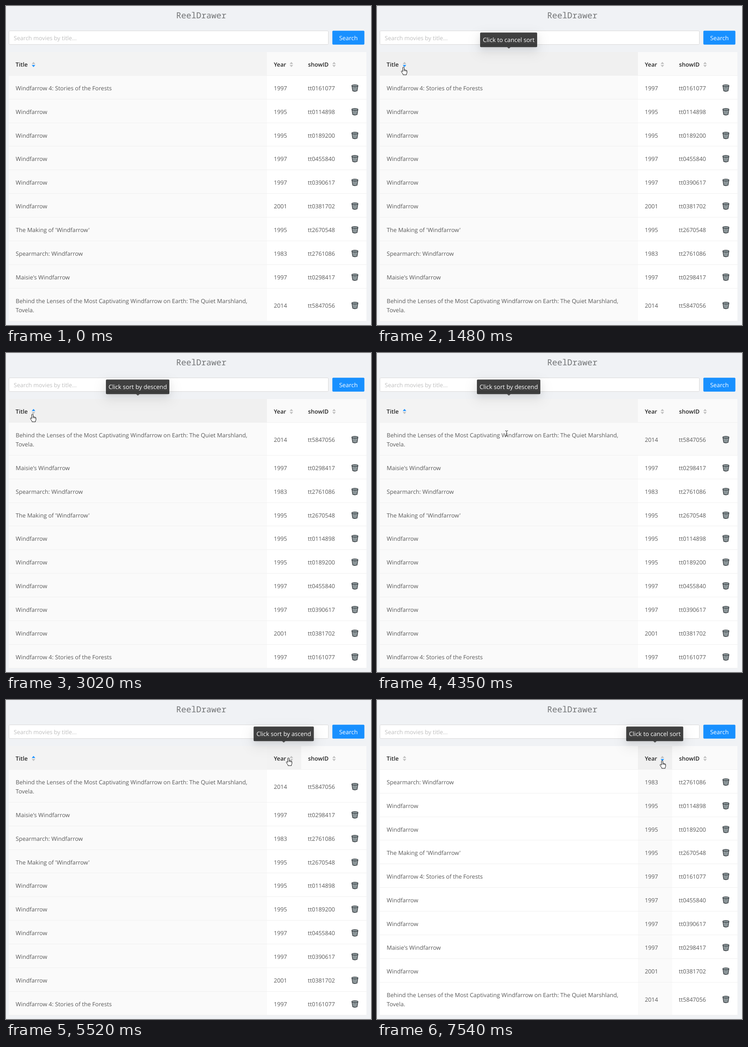
Animation, 800 px wide and 700 px high, one loop 8000 ms. Source, as an HTML page:

```html
<!DOCTYPE html>
<html lang="en">
<head>
<meta charset="utf-8">
<title>Sortable film table</title>
<style>
  html, body { margin: 0; width: 100%; height: 100%; overflow: hidden; background: #f0f2f5; }
  #stage { position: relative; width: 800px; height: 700px; overflow: hidden; }
  svg { position: absolute; left: 0; top: 0; }
  text, #tip { font: 12.65px "Open Sans", "Noto Sans", sans-serif; text-rendering: geometricPrecision; }
  text { fill: #595959; }
  .brand { font: 18.33px "Noto Sans Mono", "DejaVu Sans Mono", monospace; fill: #727476; }
  .head { font-weight: 600; fill: #262626; }
  .hint { fill: #bfbfbf; }
  .light { fill: #fff; font-size: 12.9px; }
  #tip {
    position: absolute; left: 0; top: 0; height: 31.6px; line-height: 32.4px; text-align: center;
    font-size: 13.1px; white-space: nowrap; color: #fff; background: rgba(0, 0, 0, .75); border-radius: 2px;
    box-shadow: 0 3px 6px -4px rgba(0,0,0,.12), 0 6px 16px rgba(0,0,0,.08), 0 9px 28px 8px rgba(0,0,0,.05);
  }
  #tip::after {
    content: ""; position: absolute; left: 50%; top: 100%; margin-left: -4px;
    border: 4px solid transparent; border-top: 3px solid #3d3d3d; border-bottom: 0;
  }
</style>
</head>
<body>
<div id="stage">
  <svg id="page" width="800" height="700">
    <defs>
      <g id="bin">
        <path d="M.9 3 2.6 14Q7.5 16.6 12.4 14L14.1 3Z" fill="#a3adb0"/>
        <path d="M3 5 11 14M6.5 5 12 11M2.5 8.5 7.5 15M12 5 4 14M8.5 5 3 11M12.7 8.5 7.5 15" stroke="#5d676b" stroke-width=".7" fill="none"/>
        <path d="M.9 3 2.6 14Q7.5 16.6 12.4 14L14.1 3" fill="none" stroke="#22282c" stroke-width="1.2"/>
        <ellipse cx="7.5" cy="2.9" rx="6.8" ry="2.1" fill="#8e999c" stroke="#22282c" stroke-width="1.1"/>
      </g>
    </defs>
    <text class="brand" x="373" y="27">ReelDrawer</text>
    <rect x="6.5" y="54.5" width="700" height="30" rx="2" fill="#fff" stroke="#d9d9d9"/>
    <text class="hint" x="17" y="75">Search movies by title...</text>
    <rect x="715.3" y="54.3" width="70.2" height="30.4" rx="2" fill="#1890ff"/>
    <text class="light" x="730.3" y="75">Search</text>
    <rect x="6" y="101" width="784" height="591" rx="2" fill="#fff"/>
    <rect x="6" y="101" width="784" height="52" rx="2" fill="#fafafa"/>
  </svg>
  <div id="tip"></div>
  <svg id="pointer" width="800" height="700">
    <g stroke="#111" stroke-width="1" fill="#fff" stroke-linejoin="round">
      <path id="hand" d="M-1.5 .8Q0 -1 1.5 .8V6Q3 5 4 6.5Q5.5 6 6 7.2Q7.6 7 7.7 8.6V12Q7.7 14 6.6 15V17H-1V15.5L-4.5 10.5Q-5.4 9 -4 8.5Q-3 8.3 -1.5 10ZM1.5 6V9M4 6.8V9.2M6 7.5V9.5"/>
      <path id="arrow" d="M0 0V16L3.8 12.5 6.2 18 8.6 17 6.2 11.6H11.3Z"/>
      <path id="beam" fill="none" stroke="#333" d="M-3 -5.5Q0 -5.5 0 -4Q0 -5.5 3 -5.5M0 -4V5M-3 6.5Q0 6.5 0 5Q0 6.5 3 6.5"/>
    </g>
  </svg>
</div>
<script>
const LOOP = 8000, TOP = 152.9, ROW = 51.85, TALL = 72;
const page = document.getElementById('page');
const tip = document.getElementById('tip');

function add(tag, attrs, parent = page, text) {
  const node = document.createElementNS('http://www.w3.org/2000/svg', tag);
  for (const key in attrs) node.setAttribute(key, attrs[key]);
  if (text) node.textContent = text;
  return parent.appendChild(node);
}

// Columns
const cols = {
  title: { label: 'Title', x: 6, w: 566, caret: 60.3, mid: 288.7 },
  year: { label: 'Year', x: 572, w: 75, caret: 625.5, mid: 608.9 },
  id: { label: 'showID', x: 647, w: 95, caret: 719 }
};
for (const col of Object.values(cols)) {
  const { x, w, caret: c } = col;
  col.body = add('rect', { x, y: 153, width: w, height: 539, fill: '#fff' });
  col.head = add('rect', { x, y: 101, width: w, height: 52 });
  add('text', { class: 'head', x: x + 15, y: 133 }, page, col.label);
  col.asc = add('path', { d: `M${c} 122.8l3.9 4.5h-7.8z` });
  col.desc = add('path', { d: `M${c} 134l3.9 -4.5h-7.8z` });
}
add('rect', { x: 6, y: 152, width: 784, height: 1, fill: '#f0f0f0' });

// Rows in their unsorted order
const name = 'Windfarrow';
const rows = [
  [name, 1995, 'tt0114898'],
  [name + ' 4: Stories of the Forests', 1997, 'tt0161077'],
  [name, 1995, 'tt0189200'],
  [name, 1997, 'tt0455840'],
  [`The Making of '${name}'`, 1995, 'tt2670548'],
  [`Behind the Lenses of the Most Captivating ${name} on Earth: The Quiet Marshland,|Tovela.`, 2014, 'tt5847056'],
  [name, 1997, 'tt0390617'],
  [name, 2001, 'tt0381702'],
  ['Spearmarch: ' + name, 1983, 'tt2761086'],
  [`Maisie's ${name}`, 1997, 'tt0298417']
].map(([title, year, id]) => {
  const lines = title.split('|');
  const h = lines.length > 1 ? TALL : ROW;
  const g = add('g', {});
  const back = add('rect', { x: 6, width: 784 }, g);
  const rule = add('rect', { x: 6, width: 784, height: 1, fill: '#f0f0f0' }, g);
  const texts = lines.map(s => add('text', { x: 21.3 }, g, s));
  const cells = [add('text', { x: 587 }, g, year), add('text', { x: 661.5 }, g, id)];
  const bin = add('use', { href: '#bin', x: 757.2 }, g);
  return { title, year, h, back, rule, texts, cells, bin };
});

function placeRow(row, y) {
  const start = Math.round(y), end = Math.round(y + row.h);
  const base = Math.round(y + row.h / 2 + 6);
  row.y = y;
  row.back.setAttribute('y', start);
  row.back.setAttribute('height', end - start - 1);
  row.rule.setAttribute('y', end - 1);
  row.texts.forEach((t, i) => t.setAttribute('y', Math.round(y + 32 + 20.4 * i)));
  row.cells.forEach(t => t.setAttribute('y', base));
  row.bin.setAttribute('y', base - 13);
}

const byTitle = (a, b) => a.title < b.title ? -1 : a.title > b.title ? 1 : 0;
const byYear = (a, b) => b.year - a.year;
const sorts = [
  { at: 0, col: 'title', dir: 'desc', cmp: (a, b) => byTitle(b, a) },
  { at: 1710, cmp: () => 0 },
  { at: 2960, col: 'title', dir: 'asc', cmp: byTitle },
  { at: 6230, col: 'year', dir: 'asc', cmp: byYear },
  { at: 7390, col: 'year', dir: 'desc', cmp: (a, b) => byYear(b, a) }
];

// Pointer moves: first step, last step, number of steps, goal
const moves = [
  [140, 290, 3, 275, 383],
  [530, 1000, 7, 58, 141],
  [1160, 1480, 5, 58, 134],
  [3800, 3970, 3, 58, 144],
  [4270, 4350, 2, 284, 176],
  [4430, 4520, 2, 470, 178],
  [4670, 4990, 5, 546, 120],
  [5050, 5450, 6, 618, 126],
  [5520, 6000, 7, 625, 133]
];

// Tooltip: time, opacity, column
const fades = [
  [0, 0, 'title'], [1160, .3, 'title'], [1240, .7, 'title'], [1320, 1, 'title'],
  [4430, .5, 'title'], [4520, 0, 'title'], [4830, .3, 'title'], [4910, .8, 'title'],
  [4990, 1, 'title'], [5210, .5, 'title'], [5290, .4, 'year'], [5370, .8, 'year'], [5450, 1, 'year']
];

const labels = {
  asc: ['Click sort by descend', 139.4],
  desc: ['Click to cancel sort', 125.4],
  none: ['Click sort by ascend', 132.4]
};

function pointerAt(t) {
  let x = 912, y = 703;
  for (const [from, to, steps, gx, gy] of moves) {
    if (t < from) break;
    const part = Math.min(1, (Math.floor((t - from) / (to - from) * (steps - 1)) + 1) / steps);
    x += (gx - x) * part;
    y += (gy - y) * part;
    if (part < 1) break;
  }
  return { x, y };
}

let shown;
function draw(t) {
  const sort = sorts.filter(s => s.at <= t).pop();
  if (sort !== shown) {
    shown = sort;
    let y = TOP;
    for (const row of [...rows].sort(sort.cmp)) {
      placeRow(row, y);
      y += row.h;
    }
  }

  const p = pointerAt(t);
  const inHead = p.y < TOP;
  const hover = !inHead ? null : p.x < 572 ? 'title' : 'year';
  for (const key in cols) {
    const col = cols[key], on = sort.col === key;
    col.body.setAttribute('fill', on ? '#fafafa' : '#fff');
    col.head.setAttribute('fill', hover === key ? (on ? '#f0f0f0' : '#f2f2f2') : on ? '#f3f3f3' : '#fafafa');
    for (const dir of ['asc', 'desc'])
      col[dir].setAttribute('fill', on && sort.dir === dir ? '#1890ff' : '#bfbfbf');
  }
  for (const row of rows) {
    const over = p.y >= row.y && p.y < row.y + row.h && p.x < 790;
    row.back.setAttribute('fill', over ? '#fafafa' : 'none');
  }

  const kind = inHead ? 'hand' : sort.dir === 'asc' ? 'beam' : 'arrow';
  for (const id of ['hand', 'arrow', 'beam']) {
    const node = document.getElementById(id);
    node.style.display = id === kind ? '' : 'none';
    node.setAttribute('transform', `translate(${Math.round(p.x)} ${Math.round(p.y)})`);
  }

  const [, opacity, colName] = fades.filter(f => f[0] <= t).pop();
  const [text, width] = labels[sort.col === colName ? sort.dir : 'none'];
  tip.textContent = text;
  tip.style.width = width + 'px';
  tip.style.transform = `translate(${cols[colName].mid - width / 2}px, 58.2px)`;
  tip.style.opacity = opacity;
}

const begin = performance.now();
function tick() {
  draw((performance.now() - begin) % LOOP);
  requestAnimationFrame(tick);
}
tick();
</script>
</body>
</html>
```
